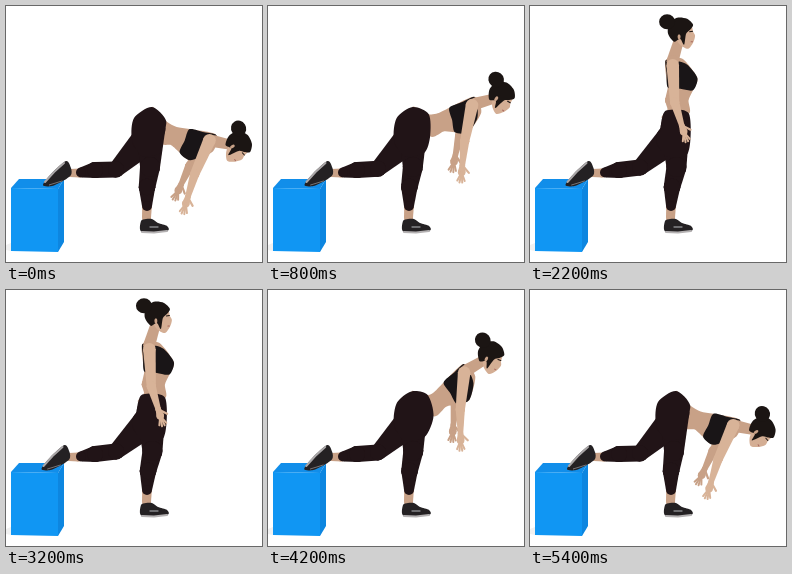
Write an HTML page with a canvas that moves like this. It is 256x256 px and loops after 5600 ms.

```html
<!DOCTYPE html>
<html lang="en">
<head>
<meta charset="utf-8">
<title>Single-leg hip hinge</title>
<style>
html, body { margin: 0; width: 100%; height: 100%; overflow: hidden; background: #fff; }
canvas { display: block; width: 100vw; height: 100vh; object-fit: contain; }
</style>
</head>
<body>
<canvas width="256" height="256"></canvas>
<script>
const g = document.querySelector("canvas").getContext("2d");
const LOOP = 5600, STEP = 200;
const PANTS = "#211417", TOP = "#191517", HAIR = "#1b1513", SHOE = "#242123";
const SKIN = "#d4ae94", SHADE = "#c8a187", LIGHT = "#d8b398";

const mix = (a, b, k) => [a[0] + (b[0] - a[0]) * k, a[1] + (b[1] - a[1]) * k];
const shift = (p, x, y) => [p[0] + x, p[1] + y];
const rad = degrees => degrees * Math.PI / 180;
const ease = x => .5 - .5 * Math.cos(Math.PI * Math.max(0, Math.min(1, x)));

// 0 is bent over, 1 is upright; rise, hold, sink
const uprightAt = t => ease((t + 150) / 2400) - ease((t - 3100) / 2250);

// Maps (along the body, toward its front) to the stage; lean is degrees from vertical
function frame(origin, lean) {
  const s = Math.sin(rad(lean)), c = Math.cos(rad(lean));
  return (along, front) => shift(origin, along * s + front * c, front * s - along * c);
}

// A point hanging below p, swung left by an angle in degrees
const hang = (p, angle, len) =>
  shift(p, -Math.sin(rad(angle)) * len, Math.cos(rad(angle)) * len);

function poseAt(u) {
  const lean = 105 - 108 * u, late = u ** 5;
  const waist = [157 + 14 * u - 23 * u ** 4, 126 - 20 * u];
  const pelvis = frame(waist, 107 - 60 * u - 38 * late);
  const torso = frame(waist, lean);
  const shoulder = torso(47, -3);
  const elbow = hang(shoulder, 27 * Math.max(0, 1 - u) ** 1.5 - 3, 37);
  const hand = hang(elbow, 17 - 34 * u, 42);
  return {
    u, shoulder, elbow, hand,
    farShoulder: torso(44, 3),
    farElbow: shift(elbow, -5, -8 + 6 * u),
    farHand: shift(hand, -9, -14 + 10 * u),
    glute: [128 + 2 * u, 112 + 14 * late],
    hip: [146 - 4 * u - 10 * late, 101 + 11 * late],
    waistBack: pelvis(0, -11), waistFront: pelvis(0, 11),
    ribBack: torso(25, -9), ribFront: torso(21, 16),
    bust: torso(33, 21), back: torso(52, -10), chest: torso(53, 7),
    loinBack: torso(12, -8), loinFront: torso(11, 11),
    nape: torso(51, -3),
    head: torso(75 + 4 * u, 11 * u - 4),
    tilt: rad(58 * (1 - u))
  };
}

function poly(points, color) {
  g.beginPath();
  points.forEach(p => g.lineTo(...p));
  g.closePath();
  g.fillStyle = color;
  g.fill();
}

// Closed smooth shape through its points
function blob(points, color, bend = .14) {
  const n = points.length, at = i => points[(i + n) % n];
  g.beginPath();
  g.moveTo(...at(0));
  for (let i = 0; i < n; i++) {
    const [a, b, c, d] = [at(i - 1), at(i), at(i + 1), at(i + 2)];
    g.bezierCurveTo(b[0] + (c[0] - a[0]) * bend, b[1] + (c[1] - a[1]) * bend,
      c[0] - (d[0] - b[0]) * bend, c[1] - (d[1] - b[1]) * bend, ...c);
  }
  g.fillStyle = color;
  g.fill();
}

function oval(x, y, rx, ry, color) {
  g.beginPath();
  g.ellipse(x, y, rx, ry, 0, 0, 7);
  g.fillStyle = color;
  g.fill();
}

function line(points, color, width) {
  g.beginPath();
  points.forEach(p => g.lineTo(...p));
  g.strokeStyle = color;
  g.lineWidth = width;
  g.lineCap = g.lineJoin = "round";
  g.stroke();
}

// Tapered tube with round ends
function limb(a, b, ra, rb, color) {
  const angle = Math.atan2(b[1] - a[1], b[0] - a[0]);
  const x = -Math.sin(angle), y = Math.cos(angle);
  poly([shift(a, x * ra, y * ra), shift(b, x * rb, y * rb),
    shift(b, -x * rb, -y * rb), shift(a, -x * ra, -y * ra)], color);
  oval(...a, ra, ra, color);
  oval(...b, rb, rb, color);
}

function arm(shoulder, elbow, tip, color) {
  const angle = Math.atan2(tip[1] - elbow[1], tip[0] - elbow[0]);
  const reach = (from, turn, len) =>
    shift(from, Math.cos(angle + turn) * len, Math.sin(angle + turn) * len);
  const wrist = reach(tip, Math.PI, 18), palm = reach(wrist, 0, 7);
  limb(shoulder, elbow, 6.3, 4.6, color);
  limb(elbow, wrist, 4.6, 2.7, color);
  limb(wrist, palm, 2.7, 3.8, color);
  for (let i = 0; i < 4; i++) {
    const turn = i * .27 - .42;
    line([palm, reach(palm, turn, 11 - Math.abs(turn) * 4)], color, 2);
  }
  line([wrist, reach(wrist, -.8, 10)], color, 2.2);
}

function drawBox() {
  poly([[0, 239], [5, 237], [5, 245], [0, 244]], "#f1f1f1");
  poly([[5, 182], [13, 173], [58, 173], [52, 183]], "#118eea");
  poly([[5, 182], [52, 183], [52, 246], [5, 245]], "#1096f3");
  poly([[52, 183], [58, 173], [58, 236], [52, 246]], "#0d86e0");
}

function drawBackShoe(u) {
  g.save();
  g.translate(-1.5 * u, 0);
  limb([64, 167], [74, 167], 4, 4.5, SHADE);
  blob([[60, 155], [65, 162], [65, 169], [57, 175], [46, 180], [37, 179], [46, 167]], SHOE);
  line([[58, 157], [48, 166], [39, 176]], "#aaa7a8", 2);
  line([[43, 179], [56, 175]], "#777375", 1);
  g.restore();
}

function drawFrontShoe() {
  limb([141, 200], [140.5, 212], 4.8, 4.5, SHADE);
  blob([[135, 215], [140, 213], [146, 213], [152, 217], [161, 220], [161, 225], [136, 226]], SHOE);
  line([[136, 226], [148, 226.5], [161, 225]], "#b4b1b2", 2);
  line([[144, 221], [152, 221]], "#85868a", 1.3);
}

function drawLegs(p) {
  const u = p.u, backKnee = [110, 163.5 - 2 * u], calf = [89, 164];
  limb([141, 133], backKnee, 15, 8, PANTS);
  limb(backKnee, calf, 8, 8, PANTS);
  limb(calf, [75, 166.5], 8, 5, PANTS);
  const knee = [144 + 2.5 * u, 161], shin = [141 + u, 181];
  limb([145, 122], knee, 14.5, 10, PANTS);
  limb(knee, shin, 10, 8.3, PANTS);
  limb(shin, [141, 200], 8.3, 5, PANTS);
  blob([p.glute, p.hip, p.waistBack, p.waistFront, [155 + 3 * u, 147], [136, 150], [126, 133]], PANTS);
}

function drawTorso(p) {
  blob([p.hip, p.waistBack, p.loinBack, p.ribBack, p.back, p.chest,
    p.bust, p.ribFront, p.loinFront, p.waistFront], SHADE, .12);
}

function drawTop(p) {
  blob([p.ribBack, mix(p.ribBack, p.back, .55), p.back, mix(p.back, p.chest, .4),
    mix(p.chest, p.bust, .3), p.bust, p.ribFront, mix(p.ribFront, p.ribBack, .5)], TOP, .13);
}

function drawHead(p) {
  limb(p.nape, mix(p.head, p.nape, .25), 6, 5, SHADE);
  g.save();
  g.translate(...p.head);
  g.rotate(p.tilt);
  blob([[0, -9], [10, -7], [12, -1], [14, 3], [12, 10], [7, 16], [-1, 12], [-5, 4]], SKIN);
  blob([[-7, 9], [-13, 1], [-12, -9], [-4, -15], [6, -14], [12, -8], [9, -3],
    [5, 1], [3, 12], [-1, 6]], HAIR);
  oval(-2, 4, 1.5, 2.6, SHADE);
  line([[8.5, -1], [11.5, -1.5]], HAIR, 1);
  line([[10, 9], [11.5, 9]], "#a8685f", 1);
  oval(-14, -11, 8, 7.5, HAIR);
  g.restore();
}

function draw(t) {
  const p = poseAt(uprightAt(t));
  g.fillStyle = "#fff";
  g.fillRect(0, 0, 256, 256);
  drawBox();
  drawBackShoe(p.u);
  drawFrontShoe();
  arm(p.farShoulder, p.farElbow, p.farHand, SHADE);
  drawTorso(p);
  drawLegs(p);
  drawTop(p);
  drawHead(p);
  arm(p.shoulder, p.elbow, p.hand, LIGHT);
}

const start = performance.now();
function tick() {
  const t = (performance.now() - start) % LOOP;
  draw(Math.floor(t / STEP) * STEP);
  requestAnimationFrame(tick);
}
tick();
</script>
</body>
</html>
```
